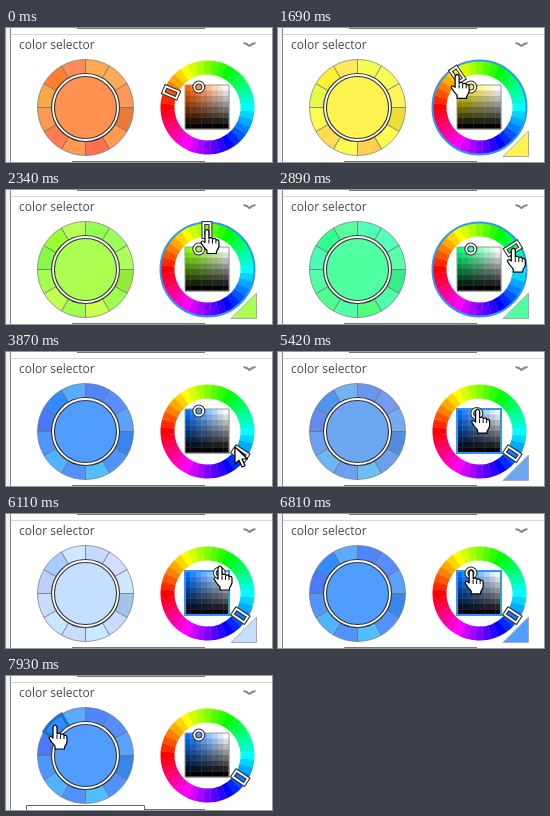
An HTML page with a canvas for the animation above (8000 ms loop, 266 px wide and 134 px high).

```html
<!DOCTYPE html>
<html lang="en">
<head>
<meta charset="utf-8">
<title>Color selector</title>
<style>
html, body { margin: 0; width: 100%; height: 100%; overflow: hidden; background: #fff; }
canvas { display: block; }
p { position: absolute; left: 13px; top: 8px; margin: 0; font: 12px/18px "Open Sans", sans-serif; color: #444b55; }
</style>
</head>
<body>
<canvas id="stage" width="266" height="134"></canvas>
<p>color selector</p>
<script>
const ctx = document.getElementById('stage').getContext('2d');
const LOOP = 8000, TAU = Math.PI * 2, RAD = Math.PI / 180;
const wheel = { x: 79.5, y: 79.5, r: 48, hub: 32.5 };
const ring = { x: 201.5, y: 79.5, r: 47, hole: 33 };
const box = { x: 179, y: 57, size: 44, cells: 8 };

// [start, end, steps]: the picture advances in steps inside each span
const spans = [[560, 1540, 8], [1690, 2610, 8], [2760, 3310, 5], [3870, 4850, 8],
  [5000, 5830, 7], [6110, 7100, 8], [7250, 7500, 3], [7800, 7930, 2]];
const ticks = [0, ...spans.flatMap(([a, b, n]) =>
  Array.from({ length: n }, (_, i) => Math.round(a + (b - a) * i / (n - 1))))];

// time, hue, saturation, value
const colorKeys = [[0, 22.6, .686, 1], [1540, 22.6, .686, 1], [1690, 56, .686, 1],
  [2340, 97, .686, 1], [3310, 214, .686, 1], [4290, 214, .686, 1], [4850, 214, 1, .87],
  [5830, 214, .22, 1], [6110, 214, .22, 1], [6680, 214, .686, 1]];
// time, x, y of the pointer tip
const pointerKeys = [[560, 145, 113], [980, 158, 82], [1260, 165, 63], [1690, 178, 45]];
const pointerKeysAfter = [[3310, 235, 102], [3870, 229, 95], [4290, 193, 60], [4850, 180, 64],
  [5830, 214, 52], [6110, 214, 52], [6680, 193, 56], [7100, 151, 56], [7250, 118, 54], [7500, 49, 49]];
// hue, saturation, value shift of each neighbour, clockwise from the top
const shades = [[8, 0, 0], [7, -.03, 0], [0, -.04, 0], [0, .08, -.08], [3, 0, 0], [-12, 0, 0],
  [3, 0, 0], [-8, 0, 0], [2, 0, 0], [10, .02, -.02], [0, .12, 0], [-4, -.03, 0]];

const hand = new Path2D('M-2 2Q0-2 2 2V9Q4 7 6 9.5Q8 8 9.5 10.5Q12 9.5 12 13V17Q11 20 9.5 22V24H0V21Q-4 17-6 13Q-5 10-2 13Z');
const arrow = new Path2D('M0 0V17L4 13.3L7 20L10 18.7L7 12H12.5Z');

function track(keys, t) {
  const i = keys.findIndex(k => k[0] > t);
  if (i < 0) return keys[keys.length - 1].slice(1);
  if (i === 0) return keys[0].slice(1);
  const a = keys[i - 1], b = keys[i], p = (t - a[0]) / (b[0] - a[0]);
  return a.slice(1).map((v, j) => v + (b[j + 1] - v) * p);
}

function hsv(h, s, v) {
  s = Math.min(1, Math.max(0, s));
  const f = n => {
    const k = (n + h / 60 + 6) % 6;
    return Math.round(255 * v * (1 - s * Math.max(0, Math.min(k, 4 - k, 1))));
  };
  return `rgb(${f(5)},${f(3)},${f(1)})`;
}

function line(color, width, path) {
  ctx.strokeStyle = color;
  ctx.lineWidth = width;
  path ? ctx.stroke(path) : ctx.stroke();
}

function outline() {
  line('#333', 4);
  line('#fff', 1.8);
}

function circle(x, y, r) {
  ctx.beginPath();
  ctx.arc(x, y, r, 0, TAU);
}

function sector(c, inner, a, b) {
  ctx.beginPath();
  ctx.arc(c.x, c.y, c.r, a, b);
  ctx.arc(c.x, c.y, inner, b, a, true);
  ctx.closePath();
}

function drawPanel() {
  ctx.fillStyle = '#fff';
  ctx.fillRect(0, 0, 266, 134);
  ctx.fillStyle = '#f1f1f1';
  ctx.fillRect(0, 0, 4, 134);
  ctx.fillStyle = '#888';
  ctx.fillRect(4, 0, 1, 134);
  ctx.fillStyle = '#d4d4d4';
  ctx.fillRect(5, 6, 261, 1);
  ctx.fillStyle = '#777';
  ctx.fillRect(71, 0, 128, 1);
  ctx.fillRect(66, 133, 133, 1);
  ctx.beginPath();
  ctx.moveTo(237.5, 15);
  ctx.quadraticCurveTo(241, 15.5, 243.5, 18);
  ctx.quadraticCurveTo(246, 15.5, 249.5, 15);
  line('#888', 1.8);
}

function drawWheel([h, s, v], hovered) {
  const slice = i => sector(wheel, wheel.hub, (i * 30 - 90) * RAD, (i * 30 - 60) * RAD);
  shades.forEach(([dh, ds, dv], i) => {
    slice(i);
    ctx.fillStyle = hsv(h + dh, s + ds, v + dv);
    ctx.fill();
    line('rgba(105,110,115,.65)', 1);
  });
  if (hovered) {
    slice(10);
    line('#1c72c4', 3);
  }
  circle(wheel.x, wheel.y, wheel.hub);
  ctx.fillStyle = hsv(h, s, v);
  ctx.fill();
  outline();
}

function drawPicker([h, s, v], onRing, onBox) {
  for (let i = 0; i < 36; i++) {
    sector(ring, ring.hole, (i * 10 - 185) * RAD, (i * 10 - 174.6) * RAD);
    ctx.fillStyle = hsv(i * 10, 1, 1);
    ctx.fill();
  }
  if (onRing) {
    circle(ring.x, ring.y, ring.r);
    line('#2e96f5', 2);
  }
  const n = box.cells, d = box.size / n;
  for (let i = 0; i < n * n; i++) {
    const col = i % n, row = (i - col) / n;
    ctx.fillStyle = hsv(h, 1 - col / (n - 1), 1 - row / (n - 1));
    ctx.fillRect(box.x + col * d, box.y + row * d, d + .3, d + .3);
  }
  ctx.beginPath();
  ctx.rect(box.x, box.y, box.size, box.size);
  onBox ? line('#2e96f5', 2) : line('#999', 1);

  ctx.save();
  ctx.translate(ring.x, ring.y);
  ctx.rotate((h - 180) * RAD);
  ctx.beginPath();
  ctx.rect(ring.hole - .5, -3.5, 14, 7);
  ctx.restore();
  outline();

  circle(box.x + (1 - s) * box.size, box.y + 2 + (1 - v) * box.size, 4.5);
  outline();

  if (onRing || onBox) {
    ctx.beginPath();
    ctx.moveTo(250.5, 103);
    ctx.lineTo(250.5, 128.5);
    ctx.lineTo(225, 128.5);
    ctx.closePath();
    ctx.fillStyle = hsv(h, s, v);
    ctx.fill();
    line('#aaa', 1);
  }
}

function drawPointer(x, y, shape) {
  ctx.save();
  ctx.translate(x, y);
  ctx.lineJoin = 'round';
  ctx.fillStyle = '#fff';
  ctx.fill(shape);
  line('#000', 1.2, shape);
  if (shape === hand) {
    ctx.beginPath();
    for (const k of [2, 5.5, 9]) {
      ctx.moveTo(k, 10);
      ctx.lineTo(k, 14);
    }
    line('#000', 1);
  }
  ctx.restore();
}

function pointerAt(t, hue) {
  if (t < 1690) return track(pointerKeys, t);
  if (t >= 3310) return track(pointerKeysAfter, t);
  const a = (hue - 180) * RAD;
  return [ring.x + 40 * Math.cos(a), ring.y + 40 * Math.sin(a)];
}

function render(time) {
  const t = ticks.filter(k => k <= time).pop();
  const color = track(colorKeys, t);
  const [x, y] = pointerAt(t, color[0]);
  const shown = t >= 560;
  const dist = Math.hypot(x - ring.x, y - ring.y);
  const onRing = shown && dist > ring.hole && dist < ring.r;
  const onBox = t >= 4290 && t <= 6680 ||
    shown && Math.max(Math.abs(x - 201), Math.abs(y - 79)) < 22;
  const onWheel = shown && Math.hypot(x - wheel.x, y - wheel.y) < wheel.r;

  drawPanel();
  drawWheel(color, t >= 7500);
  drawPicker(color, onRing && !onBox, onBox);
  if (t >= 7800) {
    ctx.fillStyle = '#fff';
    ctx.fillRect(20, 129, 119, 5);
    ctx.beginPath();
    ctx.rect(20.5, 129.5, 118, 10);
    line(t < 7930 ? '#aaa' : '#666', 1);
  }
  if (shown) drawPointer(x, y, onRing || onBox || onWheel ? hand : arrow);
}

function loop() {
  render(performance.now() % LOOP);
  requestAnimationFrame(loop);
}
loop();
</script>
</body>
</html>
```
